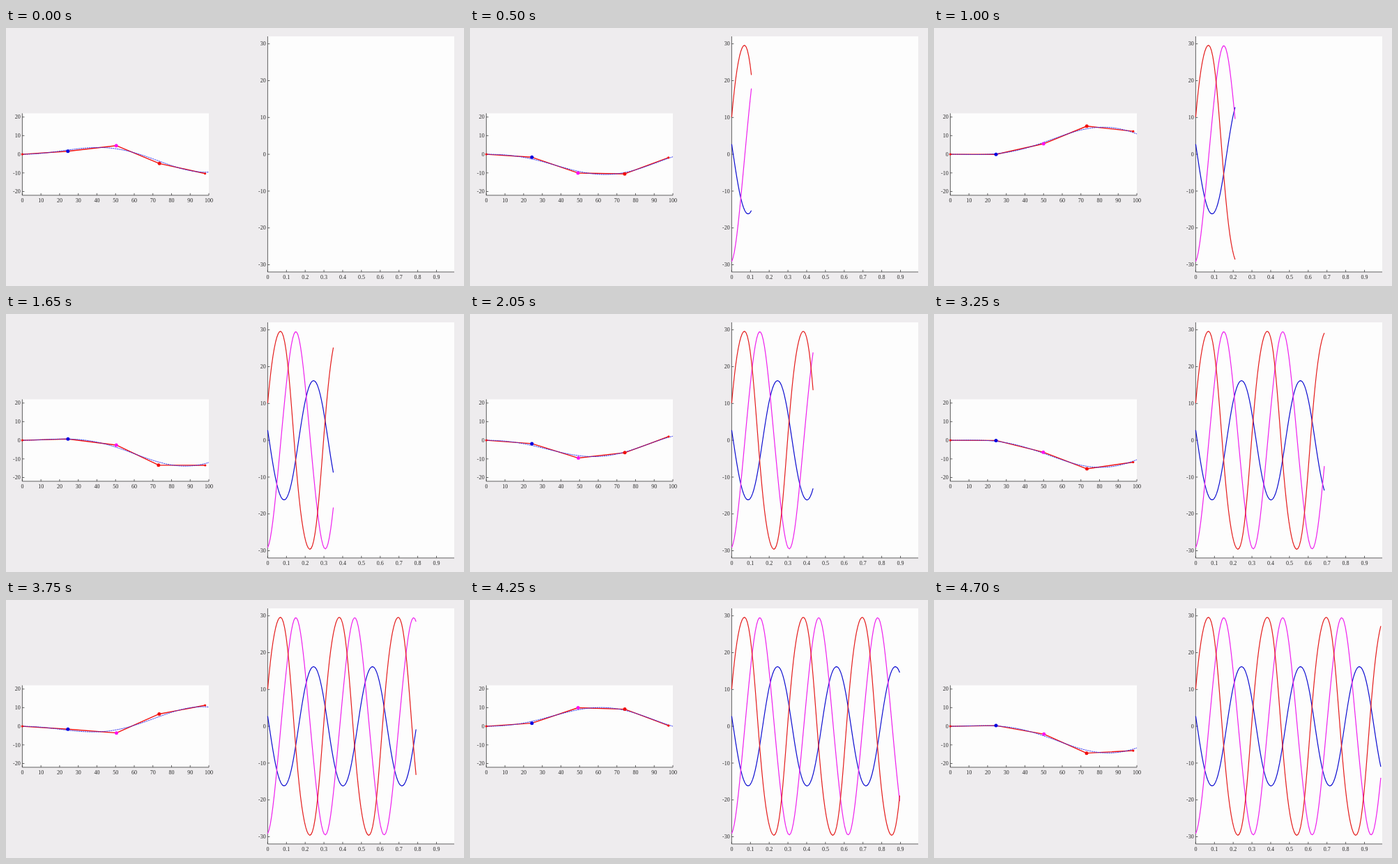
An HTML page for the animation above (4.75 s loop, 657 by 370 pixels).

```html
<!DOCTYPE html>
<html lang="en">
<head>
<meta charset="utf-8">
<title>Linkage following a travelling wave</title>
<style>
  html, body { margin: 0; width: 100%; height: 100%; overflow: hidden; background: #eeecee; }
  svg { display: block; width: 657px; height: 370px; }
  text { font: 8px "Liberation Serif", serif; fill: #262626; }
  .panel { fill: #fdfdfd; }
  .axis { fill: none; stroke: #3a3a3a; stroke-width: .8; }
  .curve { fill: none; stroke-width: 1.2; stroke-linejoin: round; }
  .body { fill: none; stroke: #2a2af0; stroke-width: .9; stroke-dasharray: 2.4 .7; }
  .links { fill: none; stroke: #f01010; stroke-width: 1.4; stroke-linejoin: round; }
</style>
</head>
<body>
<svg id="stage" viewBox="0 0 657 370"></svg>
<script>
const LOOP = 4750, STEP = 50, DT = 0.007, OMEGA = 20;
const BLUE = '#0c0cd0', MAGENTA = '#ee20ee', RED = '#e41c1c';
const { sin, cos, PI, floor, round } = Math;
const stage = document.getElementById('stage');

function add(tag, attrs, text) {
  const el = document.createElementNS('http://www.w3.org/2000/svg', tag);
  for (const key in attrs) el.setAttribute(key, attrs[key]);
  if (text !== undefined) el.textContent = text;
  return stage.appendChild(el);
}

const left = { x: 23.4, y: 181.1, sx: 2.676, sy: 2.67, top: 122.4, right: 291, bottom: 239.9 };
const right = { x: 375.4, y: 181.1, sx: 269, sy: 5.28, top: 12, right: 643, bottom: 349.9 };

const at = (p, x, y) => [p.x + p.sx * x, p.y - p.sy * y];
const trace = pts => 'M' + pts.map(p => p[0].toFixed(2) + ' ' + p[1].toFixed(2)).join('L');

function drawAxes(p, xStep, xCount, yMax) {
  add('rect', { class: 'panel', x: p.x, y: p.top, width: p.right - p.x, height: p.bottom - p.top });
  let d = `M${p.x} ${p.top}V${p.bottom}H${p.right}`;
  for (let i = 0; i <= xCount; i++) {
    const value = +(i * xStep).toFixed(1), [x] = at(p, value, 0);
    d += `M${x} ${p.bottom}v-3`;
    add('text', { x, y: p.bottom + 10.2, 'text-anchor': 'middle' }, value);
  }
  for (let value = -yMax; value <= yMax; value += 10) {
    const [, y] = at(p, 0, value);
    d += `M${p.x} ${y}h3`;
    add('text', { x: p.x - 2.7, y: y + 2.7, 'text-anchor': 'end' }, value);
  }
  add('path', { class: 'axis', d });
}

// Joint angles in degrees at phase w
const joints = [
  { color: BLUE, angle: w => -16.2 * cos(w - 1.74 + 0.025 * sin(2 * w)) },
  { color: MAGENTA, angle: w => 29.5 * cos(w - 2.99 + 0.035 * sin(2 * w)) },
  { color: RED, angle: w => 29.6 * cos(w - 1.295 + 0.075 * cos(2 * w - 0.2)) }
];
const firstAngle = w => 4.35 * cos(w + 0.476);
const lengths = [24.5, 26.1, 25.05, 25.05];

const wave = (x, w) => 0.1 * x * (sin(0.05 * x + w) - sin(w));

function linkage(w) {
  let x = 0, y = 0, heading = firstAngle(w);
  const pts = [at(left, 0, 0)];
  lengths.forEach((len, i) => {
    if (i) heading += joints[i - 1].angle(w);
    x += len * cos(heading * PI / 180);
    y += len * sin(heading * PI / 180);
    pts.push(at(left, x, y));
  });
  return pts;
}

drawAxes(left, 10, 10, 20);
drawAxes(right, 0.1, 9, 30);

for (const joint of joints) joint.path = add('path', { class: 'curve', stroke: joint.color });
const links = add('path', { class: 'links' });
const body = add('path', { class: 'body' });
const dots = ['#f01010', '#0000e0', '#ff10f0', '#f01010', '#f01010'].map((fill, i) =>
  add('circle', { fill, r: i % 4 ? 2.5 : 1.6 }));

function draw(step) {
  const last = round(step * 1.5), w = OMEGA * DT * last;

  const pts = linkage(w);
  links.setAttribute('d', trace(pts));
  dots.forEach((dot, i) => {
    dot.setAttribute('cx', pts[i][0]);
    dot.setAttribute('cy', pts[i][1]);
  });
  body.setAttribute('d', trace(Array.from({ length: 101 }, (_, x) => at(left, x, wave(x, w)))));

  for (const { path, angle } of joints) {
    const line = Array.from({ length: last + 1 }, (_, i) => at(right, i * DT, angle(OMEGA * DT * i)));
    path.setAttribute('d', last ? trace(line) : '');
  }
}

const start = performance.now();
let shown = -1;
function tick() {
  const step = floor((performance.now() - start) % LOOP / STEP);
  if (step !== shown) draw(shown = step);
  requestAnimationFrame(tick);
}
tick();
</script>
</body>
</html>
```
